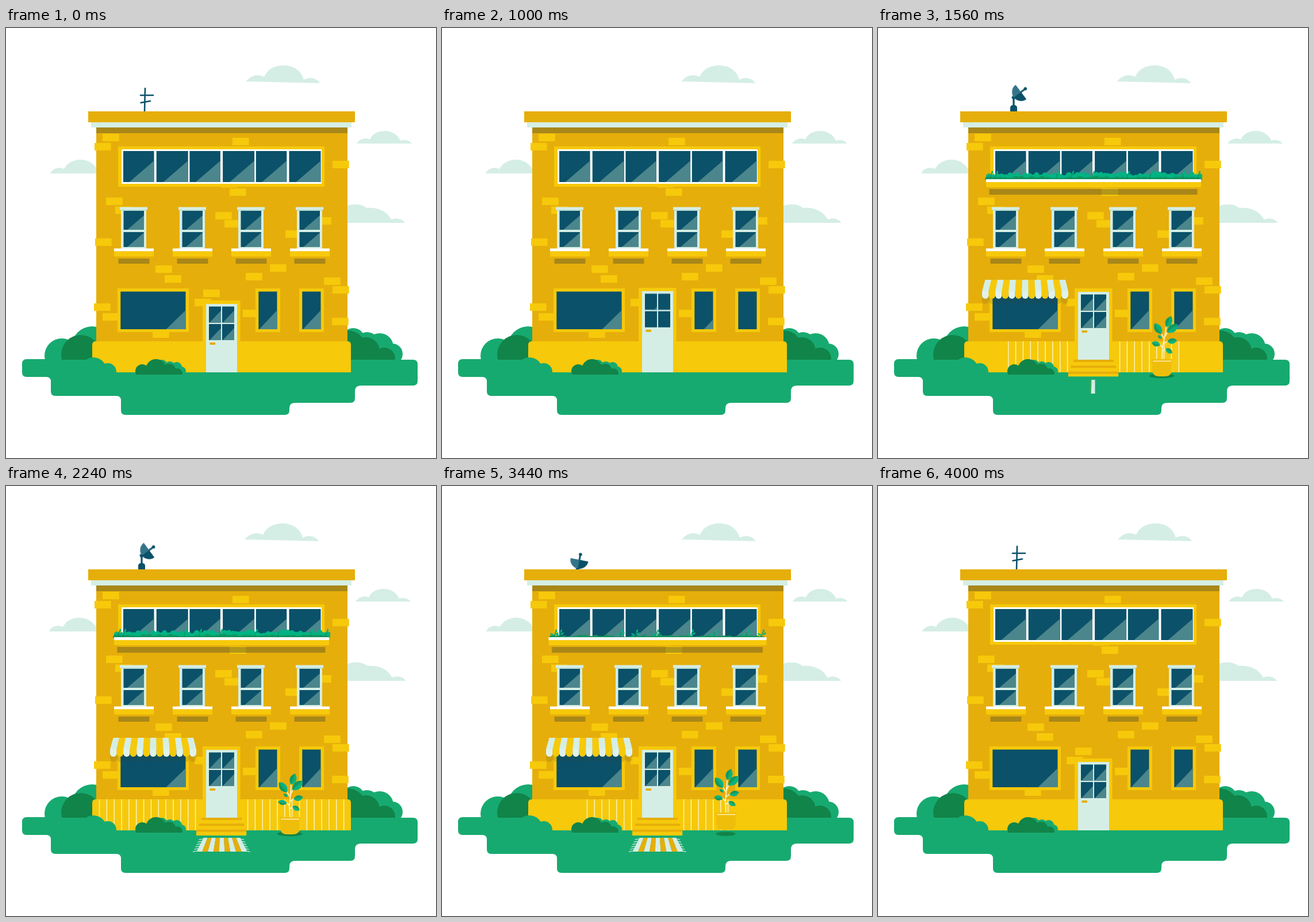
Animation of 748x748 px, one loop 4.04 s. Source, as an HTML page:

```html
<!DOCTYPE html>
<html lang="en">
<head>
<meta charset="utf-8">
<title>House makeover</title>
<style>
html, body { margin: 0; width: 100%; height: 100%; overflow: hidden; background: #fff; }
svg { display: block; width: 100%; height: 100%; }

.loop { animation: 4040ms ease-in-out infinite both; }
.cloud { animation: drift 2020ms ease-in-out infinite alternate; }
.antenna { animation-name: antenna; }
.dish { animation-name: dish; }
.turn { animation-name: turn; transform-origin: 236px 121px; }
.door { animation-name: door; }
.balcony { animation-name: widen; transform-origin: 375px 0; }
.leafy { animation-name: leafy; }
.low { animation-name: low; }
.awning { animation-name: awning; transform-origin: 256px 438px; }
.unroll { animation-name: unroll; transform-origin: 256px 438px; }
.fence { animation-name: fence; transform-origin: 375px 0; animation-timing-function: linear; }
.stairs { animation-name: stairs; transform-origin: 375px 577px; }
.rug { animation-name: rug; transform-origin: 374px 0; }
.plant { animation-name: plant; transform-origin: 493px 606px; }
.sway { animation-name: sway; transform-origin: 494px 577px; }
.shade { animation-name: shade; transform-origin: 493.5px 605px; }
.glint { animation-name: glint; transform-box: fill-box; transform-origin: 100% 100%; }

@keyframes drift { to { transform: translateX(var(--dx)); } }
@keyframes glint { 0%, 7.92%, 100% { transform: none; } 1.98%, 4.95% { transform: scale(0); } }
@keyframes antenna {
  0%, 15.8%, 97%, 100% { transform: none; }
  17.8% { transform: translateY(5px); }
  21.8%, 90.1% { transform: translateY(50px); }
  94% { transform: translateY(-4px); }
}
@keyframes dish {
  0%, 23.8%, 87.1%, 100% { transform: translateY(60px); }
  30% { transform: translateY(-3px); }
  30.7% { transform: translateY(-3px); }
  33.7%, 81.2% { transform: none; }
  82.7% { transform: translateY(-3px); }
  85.1% { transform: translateY(23px); }
}
@keyframes turn {
  0%, 23.8%, 100% { transform: rotate(-10deg); }
  30.7% { transform: rotate(17deg); }
  35.6% { transform: rotate(58deg); }
  38.6% { transform: rotate(53deg); }
  55.4%, 82.2% { transform: rotate(54deg); }
  85.1% { transform: rotate(11deg); }
}
@keyframes door {
  0%, 15.8%, 97.5%, 100% { transform: none; }
  17.8% { transform: translateY(2.3px); }
  25.7%, 90.1% { transform: translateY(-23px); }
  28.7%, 88.1% { transform: translateY(-21px); }
  95% { transform: translateY(1px); }
}
@keyframes widen {
  0%, 25.2%, 91.6%, 100% { transform: scaleX(0); }
  30.7% { transform: scaleX(1.053); }
  34.7%, 83.2% { transform: none; }
  85.1% { transform: scaleX(1.013); }
  86.1% { transform: scaleX(1.04); }
}
@keyframes leafy {
  0%, 28.2%, 78.7%, 100% { transform: translateY(18px); }
  31.2%, 75.7% { transform: none; }
}
@keyframes low {
  0%, 30.7%, 90.1%, 100% { transform: translateY(18px); }
  35.6%, 84.2% { transform: none; }
}
@keyframes awning {
  0%, 30.7%, 94%, 100% { transform: scaleX(.95); }
  36.6%, 87.1% { transform: none; }
}
@keyframes unroll {
  0%, 27.7%, 94%, 100% { transform: scaleY(0); }
  30.7% { transform: scaleY(.27); }
  36.6%, 87.1% { transform: none; }
}
@keyframes fence {
  0%, 29.7%, 92.1%, 100% { transform: scaleX(.15); }
  38.6% { transform: scaleX(.68); }
  43.6%, 77.2% { transform: none; }
  85.1% { transform: scaleX(.57); }
}
@keyframes stairs {
  0%, 29.7%, 96.5%, 100% { transform: scaleY(0); }
  30.7% { transform: scaleY(.1); }
  38.6% { transform: scaleY(.94); }
  40.6%, 87.1% { transform: none; }
}
@keyframes rug {
  0%, 37.6%, 92.1%, 100% { transform: scaleX(0); }
  38.6% { transform: scaleX(.065); }
  44.5%, 87.1% { transform: none; }
}
@keyframes plant {
  0%, 25.7%, 90.1%, 100% { transform: translateY(-30px) scale(0); }
  27.7%, 88.1% { transform: translateY(-26px); }
  30.7%, 85.1% { transform: translateY(-8px); }
  32.7%, 83.2% { transform: none; }
}
@keyframes shade {
  0%, 25.7%, 90.1%, 100% { transform: scale(0); }
  30.7%, 85.1% { transform: scale(.77, .9); }
  32.7%, 83.2% { transform: none; }
}
@keyframes sway {
  0%, 25.7% { transform: rotate(-6deg); }
  30.7% { transform: rotate(-22deg); }
  36.6% { transform: rotate(8deg); }
  38.6% { transform: rotate(5.5deg); }
  44.6% { transform: rotate(-4deg); }
  50% { transform: rotate(2deg); }
  55.4%, 70%, 100% { transform: none; }
  62% { transform: rotate(-1deg); }
}
</style>
</head>
<body>
<svg id="stage" viewBox="0 0 748 748"></svg>
<script>
const C = {
  wall: '#e6ae0a', sun: '#f6c90b', shade: '#a98718', mint: '#d5eee5', glass: '#0b5169', shine: '#4b868c',
  grass: '#17aa70', deep: '#118449', leaf: '#00b383', pale: '#fdf0b8', pot: '#efbe0a', white: '#fff'
};
const SHADOW = 'rgba(61,66,49,.36)';

const span = (n, fn) => Array.from({ length: n }, (_, i) => fn(i)).join('');
const box = (x, y, w, h, fill, more = '') =>
  `<rect x="${x}" y="${y}" width="${w}" height="${h}" fill="${fill}" ${more}/>`;
const path = (d, fill, more = '') => `<path d="${d}" fill="${fill}" ${more}/>`;
const line = (d, color, width) =>
  path(d, 'none', `stroke="${color}" stroke-width="${width}" stroke-linecap="round" stroke-linejoin="round"`);
const blob = (x, y, rx, ry, fill, more = '') =>
  `<ellipse cx="${x}" cy="${y}" rx="${rx}" ry="${ry}" fill="${fill}" ${more}/>`;
const blobs = (list, fill) => list.map(([x, y, r]) => blob(x, y, r, r, fill)).join('');
const group = (cls, body) => `<g class="loop ${cls}">${body}</g>`;
const clipped = (id, body) => `<g clip-path="url(#${id})">${body}</g>`;
const clip = (id, x, y, w, h, cls = '') =>
  `<clipPath id="${id}">${box(x, y, w, h, '#000', cls && `class="loop ${cls}"`)}</clipPath>`;

let seed = 11;
const rand = () => (seed = (seed * 16807) % 2147483647) / 2147483647;

// Glass with a triangular reflection in its lower right corner
const pane = (x, y, w, h, gw, gh, delay) => box(x, y, w, h, C.glass) +
  path(`M${x + w} ${y + h}h${-gw}L${x + w} ${y + h - gh}z`, C.shine,
    `class="loop glint" style="animation-delay:${delay}ms"`);

const cloud = (d, dx) => path(d, C.mint, `class="cloud" style="--dx:${dx}px"`);

const clouds = () =>
  cloud('M417 93Q432 76 449 85C455 71 468 65 483 65C500 65 514 74 518 90C528 84 541 87 546 96z', -2) +
  cloud('M610 201C615 193 626 190 633 194C637 184 647 179 659 179C672 179 682 186 686 196C693 193 702 196 706 201z', -2) +
  cloud('M77 253C81 244 91 241 101 245C107 234 118 229 129 229C143 229 152 236 158 244H166V253z', -2) +
  cloud('M586 339V312C600 305 617 305 627 313C645 311 663 318 670 333C679 330 689 331 694 339z', 1.5);

const ground = () => path('M36 576H78V577H708q8 0 8 8V614q0 8-8 8H617q-10 0-10 10V644q0 8-8 8H503q-10 0-10 10V665' +
  'q0 8-8 8H208q-8 0-8-8V648q0-8-8-8H86q-8 0-8-8V615q0-8-8-8H36q-8 0-8-8V584q0-8 8-8z', C.grass);

const backBushes = () => clipped('turf',
  blobs([[97, 570, 30], [150, 555, 36], [604, 542, 20], [628, 549, 20], [650, 555, 24], [672, 567, 18]], C.grass) +
  blobs([[130, 568, 34], [594, 559, 33], [626, 562, 24], [658, 575, 19]], C.deep));

const frontBushes = () =>
  blobs([[152, 596, 23], [177, 598, 15]], C.grass) +
  clipped('hedge',
    blobs([[271, 587, 10], [285, 590, 10], [297, 590, 9], [305, 597, 8]], C.grass) +
    blobs([[237, 597, 12], [261, 594, 18], [284, 595, 11], [298, 601, 9]], C.deep) +
    box(237, 594, 60, 9, C.deep));

const roofGear = () =>
  group('antenna', line('M242 105L241 146M234 117H256M234.5 130L251 127', C.glass, 2.6)) +
  group('dish',
    path('M230 147V139q0-5 6-5t6 5V147z', C.glass) + line('M236 121V136', C.glass, 3.2) +
    group('turn',
      line('M236 106V96', C.glass, 3) + blob(236, 95.5, 2.8, 2.8, C.glass) +
      blob(236, 121, 3.3, 3.3, C.glass) +
      path('M220.3 105H251.7A15.7 15.7 0 0 1 236 120.7z', C.glass) +
      path('M220.3 105H236V120.7A15.7 15.7 0 0 1 220.3 105z', '#347489')));

const bricks = [[168, 184], [154, 200], [394, 191], [568, 231], [374, 264.5], [389, 279], [174, 295], [190, 310.5],
  [364, 320], [380, 334], [537, 329], [486, 352], [155, 366], [260, 413], [276, 430], [459, 411], [417, 426],
  [553, 434], [568, 449], [343, 455], [328, 471], [153, 479], [168, 496], [412, 490], [567, 504], [255, 526]];

const walls = () =>
  box(157, 170, 437, 380, C.wall) +
  bricks.map(([x, y]) => box(x, y, 28.7, 13, C.sun)).join('') +
  box(157, 173, 437, 10, C.shade) + box(148, 163, 453, 10, C.mint) + box(143, 145, 464, 19, C.wall) +
  path('M150 599V551q0-6 6-6H594q6 0 6 6V599z', C.sun);

const topWindow = () =>
  box(195, 206, 359, 70, C.sun) + box(201, 211, 348, 60, C.white) +
  span(6, i => pane(204 + 57.7 * i, 214, i % 2 ? 55 : 53.5, 54, 43, 37, 40 + 119 * i));

const midWindow = (x, top, bottom) =>
  box(x, 316, 44, 68, C.mint) + box(x - 2, 311.5, 48, 5, C.mint) + box(x, 316, 44, 1.5, '#b9d9cf') +
  pane(x + 4.5, 318, 35.5, 33, 29, 25, top) + pane(x + 4.5, 355, 35.5, 26, 29, 25, bottom) +
  box(x - 12, 383.5, 69, 5, C.white) + box(x - 12, 388.5, 69, 9, C.sun) + box(x - 4.5, 401, 54, 9, C.shade);

const streetWindow = (x, w, gw, delay) =>
  box(x, 453, w, 76, C.sun) + pane(x + 5.3, 458.5, w - 10.8, 65.5, gw, 33, delay);

const windows = () => topWindow() +
  [[150, 130], [540, 500], [270, 250], [370, 350]].map(([a, b], i) => midWindow(200 + 102 * i, a, b)).join('') +
  streetWindow(194, 124, 34, 590) + streetWindow(434, 43, 31, 740) + streetWindow(510, 43, 31, 800);

const door = () => clipped('step', group('door',
  box(342, 474, 65.5, 150, C.sun) + box(348, 480, 54, 144, C.mint) +
  span(4, i => pane(353 + 23 * (i % 2), 484.5 + 30.5 * (i >> 1), 21, 28, 20, 21, 760 + 30 * i)) +
  box(354, 547, 10.5, 4, C.wall, 'rx="2"')));

const fence = () => clipped('fenced', span(14, k => [-1, 1].map(side =>
  box(374.3 + side * (45.5 + 12.85 * k), 545, 1.5, 54, C.pale)).join('')));

const stairs = () => clipped('stairway', span(3, i => {
  const x = 340 - 4.5 * i, y = 577 + 10.3 * i, w = 70 + 8.6 * i;
  return box(x, y, w, 10.4, C.sun) + box(x, y, w, 4, C.wall);
}));

const rug = () => {
  const stripe = i => {
    const top = 343.5 + 7.1 * i, foot = 331.5 + 9.8 * i;
    return path(`M${top} 612h7.1L${foot + 9.8} 636h-9.8z`, i % 2 ? C.wall : C.mint);
  };
  const fringe = i => {
    const y = 614 + 4.2 * i, inset = 342 - 2.1 * i;
    return line(`M${inset} ${y}l-6 1.2M${749.5 - inset} ${y}l6 1.2`, C.mint, 1.2);
  };
  return clipped('rugged', span(6, fringe) + span(9, stripe));
};

const awning = () => {
  const step = 150 / 13, topStep = 139.5 / 13;
  const flap = (i, dy = 0) => {
    const x = 181 + step * i, r = step / 2;
    return `M${x} ${458 + dy}v7.2a${r} ${r} 0 0 0 ${step} 0v-7.2z`;
  };
  const stripe = i => {
    const x = 181 + step * i, top = 186.5 + topStep * i, odd = i % 2;
    return path(`M${top} 438h${topStep}L${x + step} 458h${-step}z`, odd ? C.sun : C.mint) +
      path(flap(i), odd ? C.sun : '#dff2ea');
  };
  const shadow = path(span(13, i => flap(i, 9)), 'rgba(61,66,49,.15)');
  return group('awning', clipped('rolled', shadow + span(13, stripe)));
};

const sprig = x => line(`M${x} 264L${x + 3} 253`, C.deep, 1) +
  path(`M${x + 3} 255q-1-5 2-7q3 4-2 7zM${x + 2} 258q4-5 7-4q-1 5-7 4zM${x + 1} 260q-6-1-7-5q6 0 7 5z`, C.leaf);

const planter = () => {
  const bright = span(9, i => `<g class="loop leafy" style="animation-delay:${i * 32}ms">` +
    span(6, j => blob(193 + 41.4 * i + 7.3 * j, 264, 6 + rand() * 2, 8 + rand() * 6.5, C.leaf)) + '</g>');
  const dark = span(40, i => blob(193 + 9.3 * i, 264, 7, 3 + rand() * 4, '#12935c'));
  const sprigs = [194, 203, 309, 335, 371, 432, 472, 528, 555].map(sprig).join('');
  return clipped('ledge', bright + group('low', dark + sprigs)) +
    group('balcony', box(193.5, 280, 362, 10, SHADOW) + box(188, 263, 374, 5, C.white) + box(188, 268, 374, 9, C.sun));
};

// A two-tone leaf from its base to its tip
const leaf = ([x, y, tx, ty]) => {
  const dx = tx - x, dy = ty - y, mx = x + dx * .5, my = y + dy * .5;
  const half = s => `M${x} ${y}Q${mx - dy * s} ${my + dx * s} ${tx} ${ty}z`;
  return path(half(.55), C.leaf) + path(half(-.55), '#0f9a62');
};

const plant = () =>
  blob(493.5, 605, 22, 4.3, C.deep, 'class="loop shade"') +
  group('plant',
    group('sway',
      line('M494 578L493 556L495 535L496 518M493 556L488 551M493.5 562L500 557M494.5 541L488 531M495 537L499 528' +
        'M493.5 549L501 544', C.pale, 2) +
      [[496, 520, 503, 500], [489, 533, 475, 515], [498, 529, 516, 513], [489, 552, 473, 549],
        [500, 545, 517, 541], [498, 557, 511, 564], [490, 541, 483, 535]].map(leaf).join('')) +
    path('M475.5 576H512V582H511V594q0 12-12 12H489q-12 0-12-12V582H475.5z', C.pot) +
    line('M479 579.5H510', C.pale, 1.4));

document.getElementById('stage').innerHTML =
  '<defs>' + clip('turf', 0, 500, 748, 77) + clip('hedge', 200, 560, 140, 43) + clip('step', 300, 400, 150, 199) +
  clip('ledge', 186, 230, 378, 34) + clip('fenced', 150, 540, 450, 60, 'fence') +
  clip('stairway', 320, 577, 110, 31, 'stairs') + clip('rugged', 320, 605, 108, 35, 'rug') +
  clip('rolled', 170, 438, 172, 44, 'unroll') + '</defs>' +
  clouds() + backBushes() + roofGear() + ground() + walls() + windows() + fence() + door() +
  planter() + awning() + frontBushes() + stairs() + rug() + plant();
</script>
</body>
</html>
```
